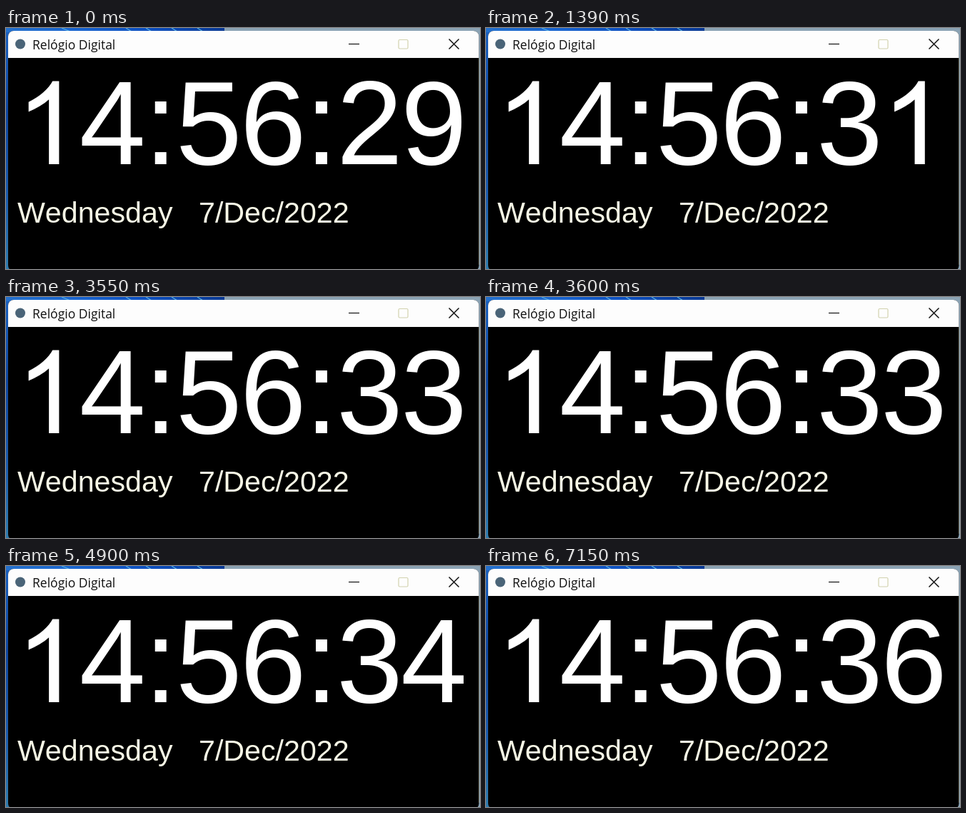
Recreate the animation shown at these times as an HTML page with a canvas. Size 664 by 338 pixels, loop 8 s.

```html
<!DOCTYPE html>
<html lang="pt">
<head>
<meta charset="utf-8">
<title>Relógio Digital</title>
<style>
  html, body { margin: 0; width: 100%; height: 100%; overflow: hidden; background: #000; }
  canvas { display: block; width: 664px; height: 338px; }
</style>
</head>
<body>
<canvas id="stage" width="664" height="338"></canvas>
<script>
const ctx = document.getElementById('stage').getContext('2d');
const LOOP = 8000;
const START = 29;
const TICKS = [520, 1340, 2470, 3550, 4810, 5810, 7100];
const ARIAL = '"Liberation Sans", Arial, sans-serif';
const EM = 162;
const BASELINE = 191;
// A numeral one without a foot, 2048 units per em
const ONE = new Path2D(`M763 0H583V1147Q518 1085 412 1023Q307 961 223 930V1104
  Q374 1175 487 1276Q600 1377 647 1472H763Z`);

function text(str, x, y, size, family, color) {
  ctx.font = `${size}px ${family}`;
  ctx.fillStyle = color;
  ctx.fillText(str, x, y);
}

function line(color, width, ...points) {
  ctx.strokeStyle = color;
  ctx.lineWidth = width;
  ctx.beginPath();
  for (const [x1, y1, x2, y2] of points) {
    ctx.moveTo(x1, y1);
    ctx.lineTo(x2, y2);
  }
  ctx.stroke();
}

function gradient(x2, y2, ...stops) {
  const g = ctx.createLinearGradient(0, 0, x2, y2);
  for (const [at, color] of stops) g.addColorStop(at, color);
  return g;
}

function desktop() {
  ctx.fillStyle = '#8ba3b4';
  ctx.fillRect(0, 0, 664, 338);
  ctx.fillStyle = gradient(306, 0, [0, '#2470cc'], [0.3, '#1a66d0'], [0.65, '#0d4fc0'], [1, '#0a3a94']);
  ctx.fillRect(0, 0, 306, 10);
  ctx.fillStyle = gradient(0, 338, [0, '#1c62c0'], [0.35, '#0f46a0'], [0.7, '#1c5cae'], [1, '#2f7cae']);
  ctx.fillRect(0, 6, 10, 332);
  line('#58b4e4', 1.2, [78, 0, 90, 5], [168, 0, 176, 5], [196, 0, 204, 5], [232, 0, 240, 5], [268, 0, 276, 5]);
}

function frame() {
  ctx.beginPath();
  ctx.roundRect(3, 4, 659.5, 337, 8);
  ctx.fillStyle = '#000';
  ctx.fill();
  ctx.save();
  ctx.clip();
  ctx.fillStyle = '#fdfdfd';
  ctx.fillRect(3, 4, 660, 38);
  ctx.restore();
  line('#77776a', 1, [662.5, 42, 662.5, 332]);

  ctx.fillStyle = '#4a6478';
  ctx.beginPath();
  ctx.arc(20, 22.5, 7, 0, Math.PI * 2);
  ctx.fill();

  text('Relógio Digital', 37, 30, 17.5, '"Open Sans", "Noto Sans", sans-serif', '#111');

  line('#111', 1.2, [480, 22.5, 495, 22.5]);
  line('#111', 1.5, [620.5, 15.5, 634.5, 29.5], [634.5, 15.5, 620.5, 29.5]);
  ctx.strokeStyle = '#d2d2ae';
  ctx.lineWidth = 1.2;
  ctx.beginPath();
  ctx.roundRect(550, 16.5, 13, 12.5, 1.5);
  ctx.stroke();
}

function one(x) {
  ctx.save();
  ctx.translate(x, BASELINE);
  ctx.scale(EM / 2048, -EM / 2048);
  ctx.fillStyle = '#fff';
  ctx.fill(ONE);
  ctx.restore();
}

function clock(seconds) {
  let x = 14;
  ctx.textAlign = 'center';
  for (const char of `14:56:${seconds}`) {
    const advance = EM * (char === ':' ? 0.278 : 0.556);
    if (char === '1') one(x);
    else text(char, x + advance / 2, BASELINE, 167, ARIAL, '#fff');
    x += advance;
  }
  ctx.textAlign = 'left';
  text('Wednesday', 16, 273, 41.2, ARIAL, '#f8f8e6');
  text('7/Dec/2022', 270, 273, 41.2, ARIAL, '#f8f8e6');
}

function draw(now) {
  const t = now % LOOP;
  ctx.fontKerning = 'none';
  desktop();
  frame();
  clock(START + TICKS.filter(at => t >= at).length);
}

const origin = performance.now();
function loop() {
  draw(performance.now() - origin);
  requestAnimationFrame(loop);
}
loop();
</script>
</body>
</html>
```
